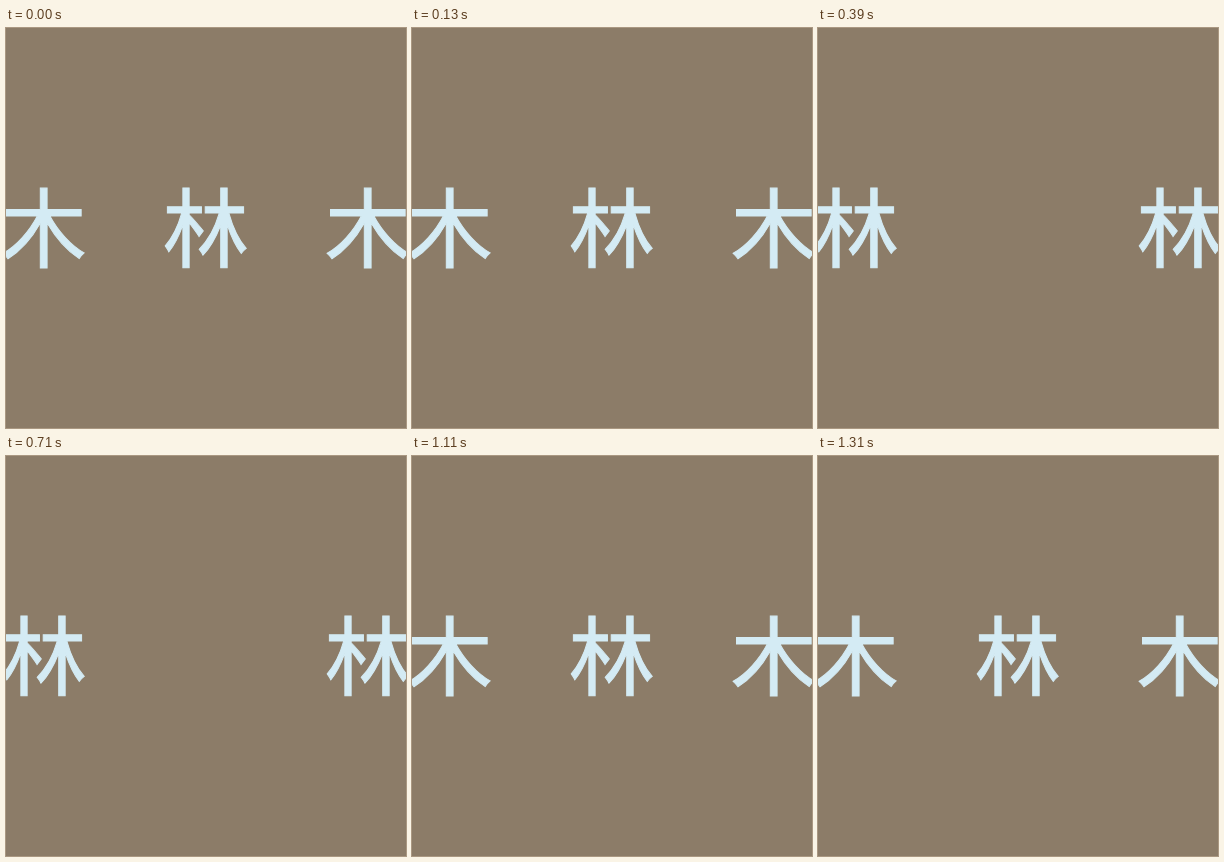
An HTML page for the animation above (1440 ms loop, 400x400 px).

```html
<!DOCTYPE html>
<html lang="ja">
<head>
<meta charset="utf-8">
<title>木 林</title>
<style>
  html, body { margin: 0; width: 100%; height: 100%; overflow: hidden; background: #8c7c68; }
  svg { display: block; width: 100%; height: 100%; }
  text {
    font: 400 86px "Noto Sans CJK JP", "Noto Sans CJK SC", "Noto Sans CJK", sans-serif;
    text-anchor: middle;
    fill: #d4ebf4;
    stroke: #d4ebf4;
    stroke-width: 1;
    filter: blur(.7px);
  }
</style>
</head>
<body>
<svg viewBox="0 0 400 400"><text y="233" x="37.7 118.7 199.7 280.7 361.7">木　林　木</text></svg>
<script>
  const LOOP = 1440;
  // [start in ms, row of five cells]
  const steps = [
    [0, '木　林　木'],
    [210, '木木　木木'],
    [390, '林　　　林'],
    [930, '木木　木木'],
    [1110, '木　林　木'],
  ];
  const row = document.querySelector('text');
  const start = performance.now();

  function draw() {
    const t = (performance.now() - start) % LOOP;
    const cells = steps.findLast(([from]) => t >= from)[1];
    if (row.textContent !== cells) row.textContent = cells;
    requestAnimationFrame(draw);
  }
  draw();
</script>
</body>
</html>
```
